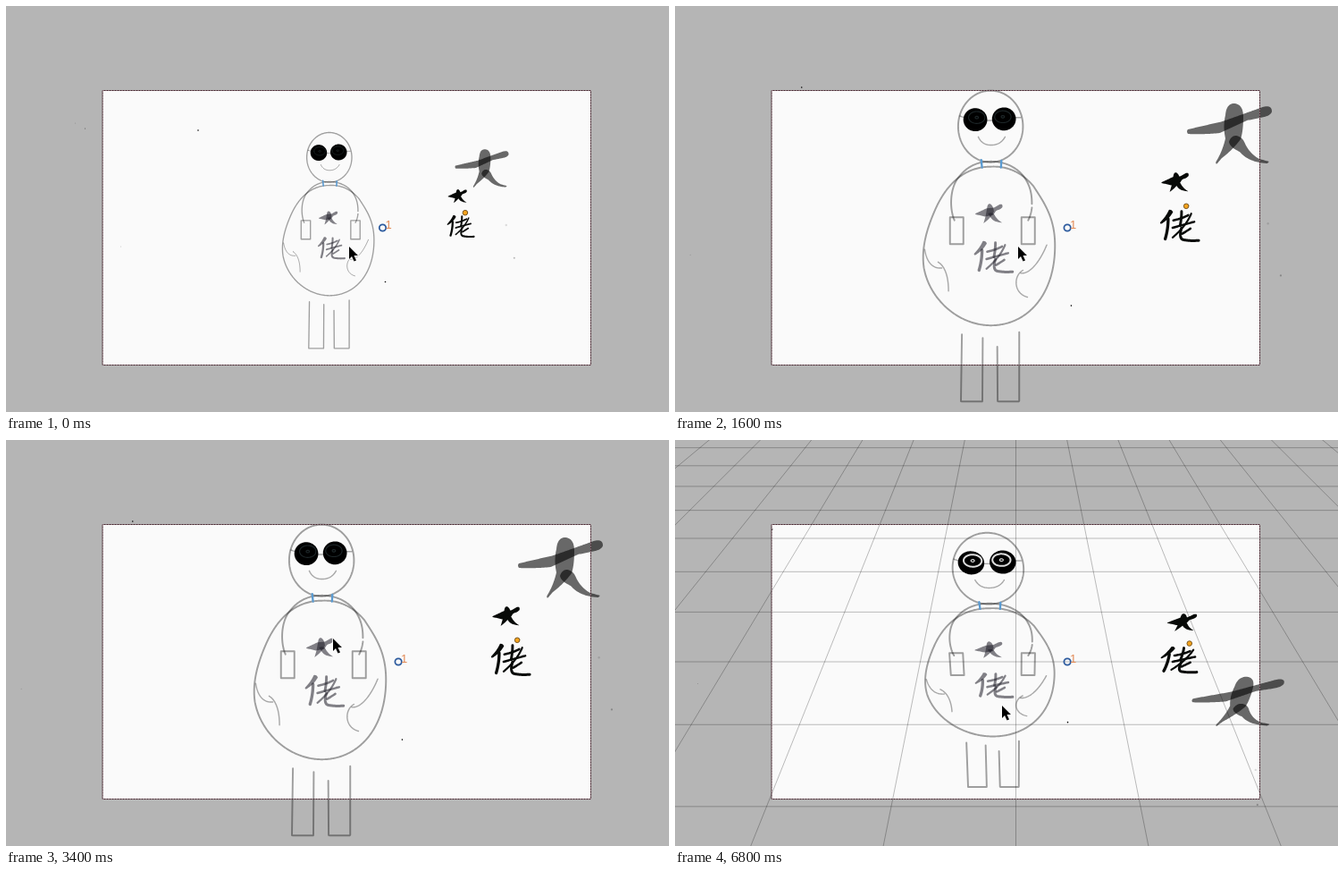
Write an HTML page with a canvas that moves like this. It is 742 by 454 pixels and loops after 7000 ms.

```html
<!DOCTYPE html>
<html lang="en">
<head>
<meta charset="utf-8">
<title>Camera zoom and tilt</title>
<style>
html, body { margin: 0; width: 100%; height: 100%; overflow: hidden; background: #b5b5b5; }
canvas { display: block; }
</style>
</head>
<body>
<canvas id="view" width="742" height="454"></canvas>
<script>
const ctx = document.getElementById('view').getContext('2d');
const W = 742, H = 454, CX = 381.5, CY = 248;
const LENS = 724, FRONT = 123, MAX_TILT = 34 * Math.PI / 180;
const LOOP = 7000, STEP = 200;
const ZOOM = '001234552122343212';   // wheel notches, one per step
const CURSOR = [
  [3200, 384, 269], [3400, 366, 222], [4800, 365, 305], [5200, 365, 303],
  [6400, 365, 303], [6600, 365.5, 300], [6800, 366, 297]
];
let scale = 1, sin = 0, cos = 1;

// Magnification of an untilted plane at depth z for a given zoom
const magnify = (zoom, z) => LENS / (LENS / zoom - z);

// Turns a path drawn in screen pixels at a given zoom into world points at depth z
function trace(d, zoom = 1.728, z = 0, dx = 0, dy = 0) {
  const path = document.createElementNS('http://www.w3.org/2000/svg', 'path');
  path.setAttribute('d', d);
  const k = magnify(zoom, z);
  const len = path.getTotalLength(), n = Math.ceil(len / 1.2);
  return Array.from({ length: n + 1 }, (_, i) => {
    const p = path.getPointAtLength(len * i / n);
    return [(p.x + dx - CX) / k, (p.y + dy - CY) / k, z];
  });
}

const oval = (x, y, rx, ry) =>
  `M${x - rx} ${y}a${rx} ${ry} 0 1 1 ${2 * rx} 0a${rx} ${ry} 0 1 1 ${-2 * rx} 0Z`;
const box = (x, y, w, h) => `M${x} ${y}h${w}v${h}h${-w}Z`;

function project([x, y, z]) {
  const f = magnify(scale, z * cos - y * sin);
  return [CX + x * f, CY + (y * cos + z * sin) * f];
}

function outline(points) {
  ctx.beginPath();
  for (const p of points) ctx.lineTo(...project(p));
}
function stroke(points, color, width) {
  outline(points);
  ctx.strokeStyle = color;
  ctx.lineWidth = width * scale;
  ctx.stroke();
}
function fill(points, color) {
  outline(points);
  ctx.fillStyle = color;
  ctx.fill();
}

const figure = [
  oval(347.5, 112, 43.5, 48),
  'M348 166C312 166 288 190 273 224C258 258 255 282 258 302C266 345 305 379 348 379C395 379 434 340 434 272C434 235 420 215 405 192C388 172 368 165 348 166Z',
  'M299 238C292 222 293 195 304 181C315 166 330 159 348 159C368 159 385 168 394 182C401 193 403 203 403 216',
  'M403 221Q402 230 398 238',
  box(293, 234, 18, 36), box(389, 234, 18, 36),
  'M309 391L307.7 481L336.5 481L337 396',
  'M356.5 407.5L357 481L386 481L386 388'
].map(d => trace(d));
const details = [
  'M331 126Q336 137 348 137Q361 137 367 126',
  'M259 277C262 295 270 303 282 302', 'M277 294C287 300 291 315 291 333',
  'M423 271C413 295 400 310 388 309', 'M391 305C378 312 378 336 397 341',
  'M306 98L312 100', 'M342 104L351 104', 'M381 100L388 100'
].map(d => trace(d));
const neck = ['M335 157L336 167', 'M362 158L361.5 167'].map(d => trace(d));
const lenses = [oval(327, 103, 16, 15.5), oval(365.5, 102, 16, 15.5)].map(d => trace(d));
const rings = [oval(329, 100, 11, 8), oval(364, 99, 11, 8)].map(d => trace(d));
const pupils = [oval(329, 100, 2.2, 1.6), oval(364, 99, 2.2, 1.6)].map(d => trace(d));

// Brush lettering: solid wedges, then strokes as [path, width]
const wedges = [
  'M577 187L592 180L602 179L609 175Q614 173 613.5 178Q612 181 605 183L601 189L590 191Q582 189 577 188Z',
  'M593 178Q594 173 597 174Q601 176 602 184Q599 192 588 200Q591 191 592 184Z',
  'M594 187Q600 184 603 189Q606 195 613 199Q604 199 599 194Z',
  'M587 224Q591 223 592.5 227Q586 238 576 243L575 241Q583 233 587 224Z'
];
const brush = [
  ['M586 236Q586 250 582 263', 4], ['M593 238Q604 236 613 231', 3],
  ['M604 226Q604 236 602 245', 3.5], ['M592 248Q606 244 621 240', 3],
  ['M617 229Q610 246 592 261', 2.6], ['M616 249Q610 253 605 256', 3],
  ['M604 248Q600 262 606 264Q616 266 627 265', 3.6]
];
function lettering(dx, dy) {
  return {
    wedges: wedges.map(d => trace(d, 1.728, 0, dx, dy)),
    brush: brush.map(([d, w]) => [trace(d, 1.728, 0, dx, dy), w / 1.728])
  };
}
const sideText = lettering(0, 0), bellyText = lettering(-250, 42);

const star = [
  'M574 138L613 129L655 114Q668 109 668 118Q667 123 655 125L640 128L610 142Q588 144 574 143Q572 140 574 138Z',
  'M616 122Q617 109 626 109Q636 110 636 124Q636 140 633 149Q624 161 612 170L606 177L605 175Q613 162 616 148Q613 135 616 122Z',
  'M620 152Q622 145 628 145Q635 146 638 154Q644 166 654 171L665 174L663 176Q642 175 632 163Q621 158 620 152Z'
].map(d => trace(d, 1.44, FRONT));

// x, y, z, radius, opacity
const specks = [
  [-166.5, -109, 0, .8, 1], [43, 60.5, 0, .8, 1], [-293, -111, 0, .6, .5],
  [-304, -117, 0, .6, .2], [-253, 21, 0, .6, .2],
  [148, -2.5, FRONT, 1.2, .12], [155.5, 28, FRONT, 1.1, .25]
];

function drawText(set, color) {
  set.wedges.forEach(p => fill(p, color));
  set.brush.forEach(([p, w]) => stroke(p, color, w));
}

function disc(x, y, r) {
  ctx.beginPath();
  ctx.arc(x, y, r, 0, 7);
}

function drawGrid() {
  const at = (m, n) => {
    const f = 1 / (1 - 111 * n * cos / 790);
    return [CX + 107 * m * f, CY + 111 * n * sin * f];
  };
  const line = (a, b) => {
    ctx.beginPath();
    ctx.moveTo(...a);
    ctx.lineTo(...b);
    ctx.stroke();
  };
  ctx.lineWidth = 1;
  ctx.strokeStyle = 'rgba(0,0,0,.26)';
  for (let m = -10; m <= 10; m++) line(at(m, -10), at(m, 5));
  for (let n = -10; n <= 5; n++) line(at(-10, n), at(10, n));
}

function drawFrameBorder() {
  ctx.lineWidth = 1;
  ctx.strokeStyle = '#40242c';
  ctx.strokeRect(108.5, 94.5, 546, 307);
  ctx.setLineDash([1, 2]);
  ctx.strokeStyle = 'rgba(235,215,220,.4)';
  ctx.strokeRect(108.5, 94.5, 546, 307);
  ctx.setLineDash([]);
}

function drawCursor(t) {
  let i = 0;
  while (i < CURSOR.length - 2 && t > CURSOR[i + 1][0]) i++;
  const [t0, x0, y0] = CURSOR[i], [t1, x1, y1] = CURSOR[i + 1];
  const u = Math.min(1, Math.max(0, (t - t0) / (t1 - t0)));
  ctx.save();
  ctx.translate(x0 + (x1 - x0) * u, y0 + (y1 - y0) * u);
  const arrow = new Path2D('M0 0V14L3 11L5.5 16.5L8 15.5L5.5 10H10Z');
  ctx.strokeStyle = '#fff';
  ctx.lineWidth = 1.6;
  ctx.stroke(arrow);
  ctx.fillStyle = '#000';
  ctx.fill(arrow);
  ctx.restore();
}

function draw(now) {
  const slot = Math.floor(now % LOOP / STEP), t = slot * STEP;
  const tilt = MAX_TILT * Math.min(1, Math.max(0, (t - 3400) / 1400));
  scale = 1.2 ** ZOOM[Math.min(slot, ZOOM.length - 1)];
  sin = Math.sin(tilt);
  cos = Math.cos(tilt);

  ctx.lineCap = ctx.lineJoin = 'round';
  ctx.fillStyle = '#b5b5b5';
  ctx.fillRect(0, 0, W, H);
  ctx.fillStyle = '#fafafa';
  ctx.fillRect(108, 94, 547, 308);
  if (tilt) drawGrid();

  figure.forEach(p => stroke(p, 'rgba(0,0,0,.37)', 1.35));
  details.forEach(p => stroke(p, 'rgba(0,0,0,.33)', 1));
  neck.forEach(p => stroke(p, '#5a9bd2', 1.6));
  lenses.forEach(p => fill(p, '#000'));
  const glint = tilt ? '#dcdcdc' : '#1d2628';
  rings.forEach(p => stroke(p, glint, tilt ? 1.4 : .8));
  pupils.forEach(p => stroke(p, glint, .8));
  drawText(bellyText, 'rgba(30,28,38,.55)');
  drawText(sideText, '#080a08');

  for (const [x, y, z, r, a] of specks) {
    disc(...project([x, y, z]), r);
    ctx.fillStyle = `rgba(0,0,0,${a})`;
    ctx.fill();
  }
  star.forEach(p => fill(p, 'rgba(0,0,0,.58)'));
  drawFrameBorder();

  disc(...project([132.4, -16.8, 0]), 2.8);
  ctx.fillStyle = '#f5a31c';
  ctx.fill();
  ctx.lineWidth = 1;
  ctx.strokeStyle = '#7a5a28';
  ctx.stroke();

  const [px, py] = project([40, 0, 0]);
  disc(px, py, 3.7);
  ctx.lineWidth = 1.8;
  ctx.strokeStyle = '#2d5b9e';
  ctx.stroke();
  ctx.fillStyle = '#e28a55';
  ctx.font = '13px "Liberation Sans", sans-serif';
  ctx.fillText('1', px + 3, py + 1);

  drawCursor(t);
}

const start = performance.now();
function tick() {
  draw(performance.now() - start);
  requestAnimationFrame(tick);
}
tick();
</script>
</body>
</html>
```
